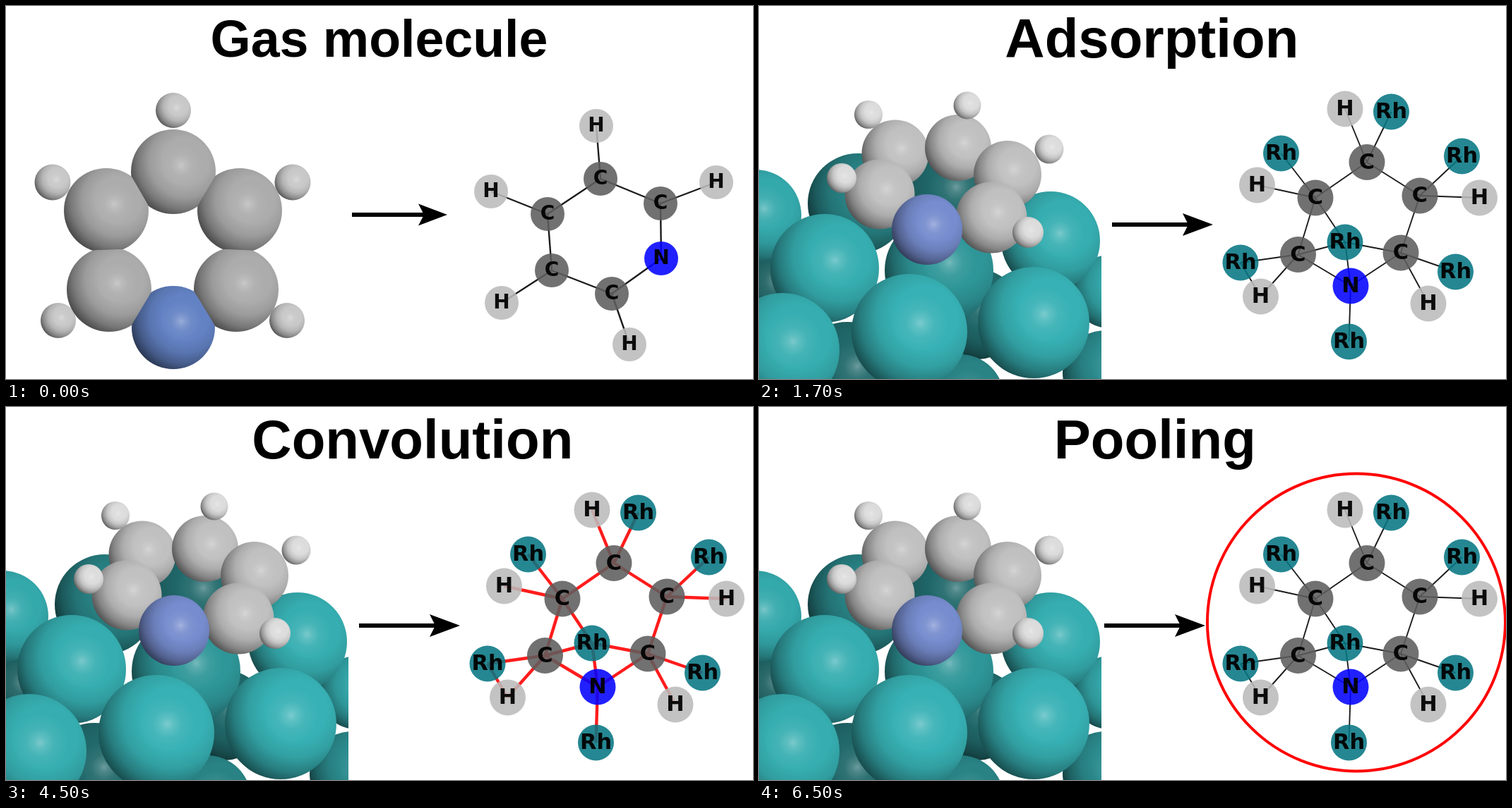
An HTML page with a canvas that plays this animation: 1058x529 px, repeating every 8 s.

```html
<!DOCTYPE html>
<html lang="en">
<head>
<meta charset="utf-8">
<title>Molecule graph</title>
<style>
html, body { margin: 0; overflow: hidden; background: #fff; }
canvas { display: block; }
</style>
</head>
<body>
<canvas id="stage" width="1058" height="529"></canvas>
<script>
const ctx = document.getElementById('stage').getContext('2d');
const LOOP = 8000;
const TEAL = [54, 174, 177], CARBON = [192, 192, 192], HYDROGEN = [220, 220, 220];
const GREY = [172, 172, 172], PALE = [200, 200, 200];
const NODE_FILL = { H: '#bbb', C: '#5e5e5e', N: '#0303ff', Rh: '#077783' };

// title, ink centre
const SCENES = [
  ['Gas molecule', 529], ['Adsorption', 554.5], ['Neural network', 553.5],
  ['Convolution', 575], ['Pooling', 561]
];

const gasGraph = {
  size: 28, r: 24,
  nodes: [
    ['H', 836, 170], ['H', 687, 263], ['H', 1006, 250], ['C', 842, 245],
    ['C', 767, 295], ['C', 927, 280], ['N', 928, 358], ['C', 773, 375],
    ['C', 858, 408], ['H', 702, 421], ['H', 883, 480]
  ],
  bonds: '0-3 1-4 2-5 3-4 3-5 5-6 4-7 7-8 8-6 7-9 8-10'
};
const surfaceGraph = {
  size: 30.4, r: 25.5,
  nodes: [
    ['H', 830, 146], ['Rh', 895.5, 150], ['Rh', 739.5, 209], ['H', 705.5, 254],
    ['Rh', 995.5, 213], ['H', 1020.5, 272], ['C', 861, 221.5], ['C', 788, 272],
    ['C', 936, 269], ['C', 763.5, 352.5], ['C', 909, 350], ['Rh', 830, 335],
    ['Rh', 682, 364], ['H', 710.5, 412], ['N', 838, 397], ['Rh', 986.5, 377],
    ['H', 948, 422], ['Rh', 835.5, 476]
  ],
  bonds: '6-0 6-1 6-7 6-8 7-2 7-3 7-9 7-11 8-4 8-5 8-10 9-12 9-13 ' +
    '9-14 9-11 11-10 11-14 10-14 10-15 10-16 14-17 12-13'
};

// Metal atoms from back to front: x, y, radius, brightness
const metal = [
  [265, 268, 76, .6], [140, 280, 71, .74], [12, 400, 64, .55],
  [125, 522, 74, .6], [308, 437, 64, .6], [285, 556, 62, .75],
  [490, 520, 60, .8], [496, 405, 52, .95], [-5, 297, 65, .97],
  [413, 333, 70, 1], [255, 375, 77, .86], [93, 372, 77, 1],
  [389, 449, 79, 1.02], [213, 462, 82, 1.02], [33, 488, 81, 1]
];
// Adsorbed molecule from back to front
const adsorbed = [
  [193, 209, 47.5, CARBON], [155, 154, 20, HYDROGEN],
  [282, 201, 47, CARBON], [295, 141, 19.5, HYDROGEN],
  [352, 239, 48, CARBON], [411, 203, 20.5, HYDROGEN],
  [171, 267, 49.5, CARBON], [117, 244, 21, HYDROGEN],
  [329, 300, 50.5, CARBON], [381, 321, 22, HYDROGEN],
  [238, 317, 50, [118, 140, 206]]
];
const gas = [
  [237, 148, 25, PALE], [66, 250, 25.5, PALE], [406, 250, 25.5, PALE],
  [74, 446, 25, PALE], [398, 446, 25, PALE],
  [237, 235, 60, GREY], [142, 290, 60, GREY], [331, 290, 60, GREY],
  [146, 402, 60, GREY], [326, 402, 60, GREY], [237, 456, 59, [99, 130, 196]]
];

const shade = (rgb, k) => `rgb(${rgb.map(v => Math.min(255, v * k))})`;

function disc(x, y, r) {
  ctx.beginPath();
  ctx.arc(x, y, r, 0, 2 * Math.PI);
}

function line(x1, y1, x2, y2) {
  ctx.beginPath();
  ctx.moveTo(x1, y1);
  ctx.lineTo(x2, y2);
  ctx.stroke();
}

function radial(x, y, r, stops) {
  const g = ctx.createRadialGradient(x, y, 0, x, y, r);
  stops.forEach(([at, color]) => g.addColorStop(at, color));
  return g;
}

// Body lit from the upper right, then a soft highlight
function sphere(x, y, r, rgb, k = 1) {
  disc(x, y, r);
  ctx.fillStyle = radial(x + r * .28, y - r * .24, r * 1.37, [
    [0, shade(rgb, k)], [.4, shade(rgb, k)], [.62, shade(rgb, k * .9)],
    [.82, shade(rgb, k * .7)], [1, shade(rgb, k * .42)]
  ]);
  ctx.fill();
  ctx.fillStyle = radial(x + r * .19, y - r * .15, r * .5, [
    [0, 'rgba(255,255,255,.34)'], [.2, 'rgba(255,255,255,.2)'],
    [.5, 'rgba(255,255,255,.07)'], [1, 'rgba(255,255,255,0)']
  ]);
  ctx.fill();
}

// Keep only the side of the plane where two touching spheres meet
function clipAgainst([x, y, r], [x2, y2, r2]) {
  const dx = x2 - x, dy = y2 - y, d = Math.hypot(dx, dy);
  if (!d || d >= r + r2) return;
  const cut = (d * d + r * r - r2 * r2) / (2 * d) + .3;
  const half = new Path2D(), side = new Path2D();
  half.rect(cut - 400, -400, 400, 800);
  side.addPath(half, new DOMMatrix([dx / d, dy / d, -dy / d, dx / d, x, y]));
  ctx.clip(side);
}

function drawGas() {
  for (const a of gas) {
    ctx.save();
    gas.forEach(b => clipAgainst(a, b));
    sphere(...a);
    ctx.restore();
  }
}

function drawSurface() {
  ctx.save();
  ctx.beginPath();
  ctx.rect(0, 0, 485, 529);
  ctx.clip();
  metal.forEach(([x, y, r, k]) => sphere(x, y, r, TEAL, k));
  adsorbed.forEach(a => sphere(...a));
  ctx.restore();
}

function drawArrow(x, y, length, head, half) {
  const tip = x + length;
  ctx.strokeStyle = ctx.fillStyle = '#000';
  ctx.lineWidth = 5.8;
  line(x, y, tip - head + 10, y);
  ctx.beginPath();
  ctx.moveTo(tip, y);
  ctx.lineTo(tip - head, y - half);
  ctx.lineTo(tip - head + 8, y);
  ctx.lineTo(tip - head, y + half);
  ctx.fill();
}

function drawGraph({ size, r, nodes, bonds }, bondColor, bondWidth, textColor) {
  if (bondWidth) {
    ctx.strokeStyle = bondColor;
    ctx.lineWidth = bondWidth;
    for (const bond of bonds.split(' ')) {
      const [a, b] = bond.split('-').map(i => nodes[i]);
      line(a[1], a[2], b[1], b[2]);
    }
  }
  ctx.globalAlpha = .88;
  for (const [kind, x, y] of nodes) {
    ctx.fillStyle = NODE_FILL[kind];
    disc(x, y, r);
    ctx.fill();
  }
  ctx.globalAlpha = .94;
  ctx.fillStyle = textColor;
  ctx.font = `bold ${size}px "DejaVu Sans", sans-serif`;
  ctx.textAlign = 'center';
  for (const [kind, x, y] of nodes) ctx.fillText(kind, x, y + size * .365 - 2);
  ctx.globalAlpha = 1;
}

function drawTitle(text, centre, size, baseline) {
  ctx.font = `bold ${size}px "Liberation Sans", Arial, sans-serif`;
  ctx.textAlign = 'left';
  ctx.fillStyle = '#000';
  const m = ctx.measureText(text);
  const shift = (m.actualBoundingBoxLeft - m.actualBoundingBoxRight) / 2;
  ctx.fillText(text, centre + shift, baseline);
}

function draw(scene) {
  ctx.fillStyle = '#fff';
  ctx.fillRect(0, 0, 1058, 529);
  const [title, centre] = SCENES[scene];
  if (scene === 0) {
    drawTitle(title, centre, 73.5, 72);
    drawGas();
    drawArrow(490, 296, 135, 41, 15.5);
    drawGraph(gasGraph, '#1c1c1c', 2.4, '#000');
    return;
  }
  const network = scene === 2, convolution = scene === 3, pooling = scene === 4;
  drawTitle(title, centre, 78, 73);
  drawSurface();
  drawArrow(pooling ? 489 : 500, 310, 143, 43, 16);
  drawGraph(surfaceGraph, convolution ? '#ff1c1c' : '#1c1c1c',
    network ? 0 : convolution ? 4.4 : 1.9, network ? '#ff0000' : '#000');
  if (pooling) {
    ctx.strokeStyle = '#f00';
    ctx.lineWidth = 4;
    disc(846, 305.5, 211);
    ctx.stroke();
  }
}

let shown = -1;
const start = performance.now();
function tick(now) {
  const t = Math.max(0, now - start) % LOOP;
  const scene = t < 500 ? 0 : 1 + Math.floor((t - 500) / 2000);
  if (scene !== shown) draw(shown = scene);
  requestAnimationFrame(tick);
}
tick(start);
</script>
</body>
</html>
```
